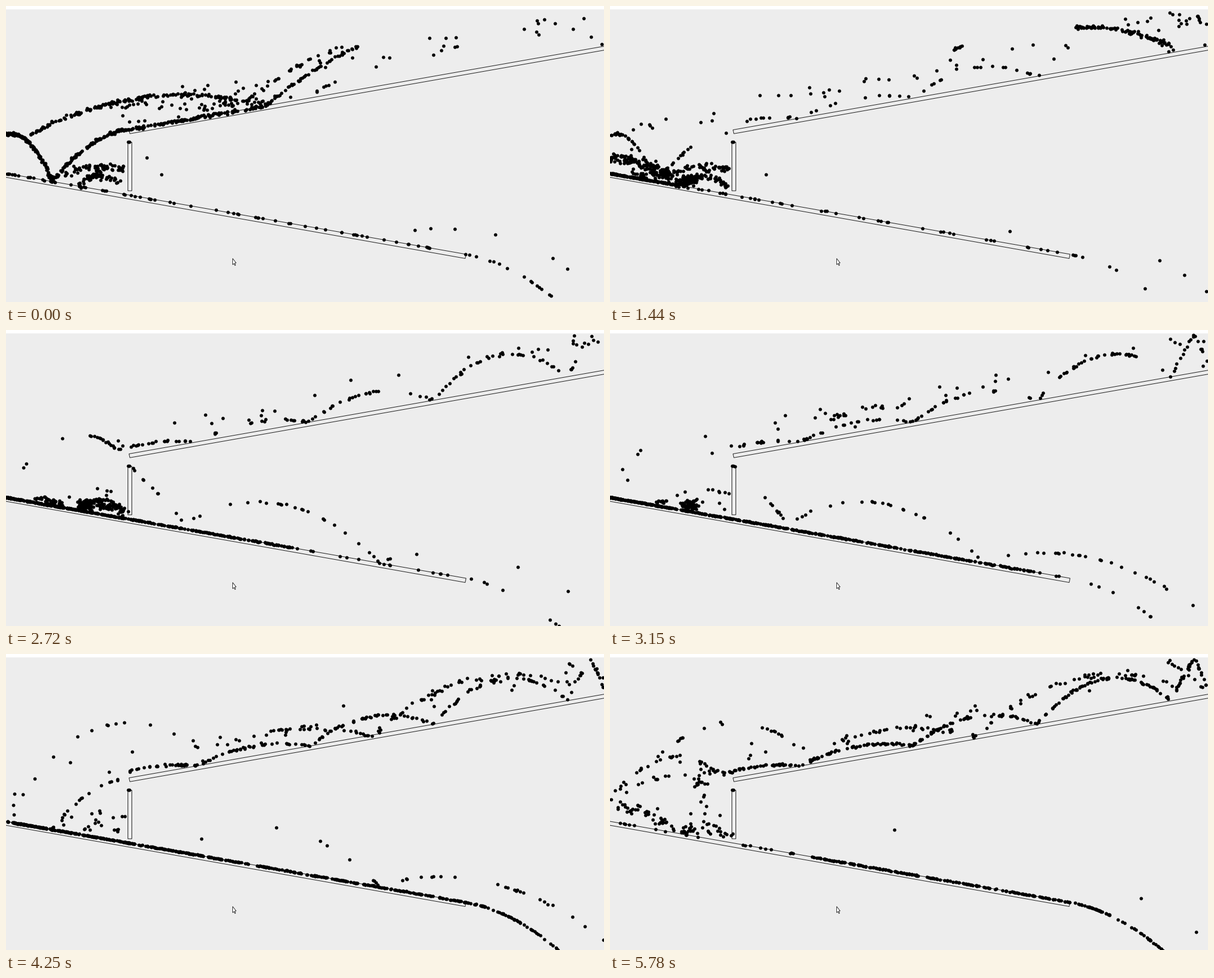
A matplotlib script for the animation above (5.88 s loop, 1062 by 527 pixels).

```python
import numpy as np
import matplotlib.pyplot as plt
from matplotlib.animation import FuncAnimation
from matplotlib.patches import Polygon, Rectangle

W, H, DPI = 1062, 527, 128
FRAMES, STEP = 56, 105
LOOP = FRAMES * STEP / 1000
GRAVITY = 2000  # px / s^2
SLOPE = np.tan(np.radians(10))
BG, PT = "#ededed", 72 / DPI

rng = np.random.default_rng(11)
streams = []


def floor(x):
    return 298 + SLOPE * x


def roof(x):
    return 220.5 - SLOPE * (x - 218)


def hops(points, rises, v=600):
    """Motion along parabolas joining the points; v limits the speed."""
    pts, rises = np.array(points, float), np.array(rises, float)
    d = np.diff(pts, axis=0)
    spans = np.maximum(np.sqrt(8 * rises / GRAVITY), np.hypot(*d.T) / v)
    ends = np.cumsum(spans)

    def move(age):
        age = age[(age >= 0) & (age < ends[-1])]
        k = np.searchsorted(ends, age, side="right")
        p = 1 - (ends[k] - age) / spans[k]
        pos = pts[k] + d[k] * p[:, None]
        pos[:, 1] -= 4 * rises[k] * p * (1 - p)
        return pos

    move.life = ends[-1]
    return move


def slide(age):
    """Steady acceleration down the ramp, then free fall past its end."""
    age = age[(age >= 0) & (age < slide.life)]
    x = 60 * age + 85 * age**2
    return np.column_stack([x, floor(x) + 0.0021 * np.maximum(x - 817, 0) ** 2])


slide.life = 3.15


def stream(move, n, start, stop, power=1.0, jit=1.0):
    """Launch n balls between two times; power < 1 makes the flow swell."""
    launch = start + (stop - start) * rng.random(n) ** power
    streams.append((move, launch, rng.normal(0, jit, (n, 2))))


# Lower ramp: a trickle, then a dense sheet with a sharp tail
stream(slide, 95, -3.1, 0.5, jit=0.3)
stream(slide, 700, 0.5, 4.05, jit=0.3)
stream(slide, 20, 4.05, LOOP, jit=0.3)

# Over the wall and along the ramp in long hops
spill = hops([(222, 243), (316, 345), (662, 412), (1062, 510)], [3, 69, 54])
stream(spill, 25, -1.5, LOOP, jit=0.8)
stream(spill, 60, 1.7, 3.6, jit=0.8)

# Growing bounces up the upper bar
climb = hops([(213, 210), (338, 199), (538, 163), (758, 125),
              (997, 83), (1037, 9), (1062, 62)], [6, 17, 33, 60, 4, 3])
stream(climb, 600, -2.5, LOOP, power=0.35)
stream(hops([(990, 10), (1060, 70)], [2], v=300), 120, -1, LOOP, power=0.6, jit=2)
stream(hops([(390, 160), (650, 146), (728, 87), (1000, 55)], [21, 4, 34]),
       230, 2.9, LOOP, jit=2)
stream(hops([(180, 200), (450, 150), (760, 80), (1062, 30)], [15, 15, 15], v=450),
       110, -2, LOOP, jit=9)

# Opening surge: off the ramp, onto the bar and away
surge = hops([(0, 229), (82, 312), (220, 219), (460, 178), (625, 72)], [27, 20, 0, 8])
stream(surge, 450, -1.6, 0.05, power=0.6, jit=1.3)
stream(hops([(40, 230), (425, 170), (740, 53), (1000, 72)], [36, 34, 24]),
       200, -1, 0.02, power=0.6, jit=1.5)
stream(hops([(185, 178), (330, 183), (460, 172)], [6, 4]), 60, -0.6, 0.05, jit=4)
stream(hops([(0, 229), (82, 312), (220, 219)], [27, 20]), 70, 0.9, 1.5)

# Leaps from the left edge up to the bar
leap = hops([(0, 258), (205, 220)], [55])
stream(leap, 40, 1.6, 2.3)
stream(leap, 70, 4.6, LOOP, jit=1.5)
stream(hops([(60, 205), (345, 172)], [66]), 65, 3.6, LOOP, jit=1.5)
stream(hops([(0, 250), (125, 216), (213, 208)], [6, 3]), 120, 4.5, LOOP, jit=2)
stream(hops([(82, 310), (220, 219)], [20]), 35, 3.6, 4.5)
stream(hops([(150, 237), (162, 215), (172, 300)], [4, 0], v=250), 40, 5.2, 6, jit=4)
stream(hops([(0, 270), (90, 200), (200, 215)], [10, 20], v=300), 60, 0, LOOP, jit=12)

# Heap in front of the wall
heap = hops([(0, 270), (130, 317), (212, 326)], [9, 12], v=150)
stream(heap, 230, 0.3, 1.5, jit=5)
stream(heap, 75, 4.3, LOOP, jit=5)
bounce = hops([(82, 311), (210, 290), (130, 318), (212, 328)], [14, 12, 20])
stream(bounce, 550, -0.7, 2.2, jit=2.5)
stream(bounce, 90, 2.2, LOOP, jit=2.5)
stream(hops([(132, 311), (150, 316)], [3], v=20), 160, 0.7, 3.3, jit=4)
stream(hops([(40, 300), (100, 310)], [2], v=60), 60, 1, 2.4, jit=3)


fig = plt.figure(figsize=(W / DPI, H / DPI), dpi=DPI, facecolor="white")
ax = fig.add_axes([0, 0, 1, 1])
ax.set(xlim=(0, W), ylim=(H, 0))
ax.axis("off")
ax.add_patch(Rectangle((0, 6), W, H - 6, fc=BG, ec="none", zorder=0))


def outline(pts, fill, ink, z):
    ax.add_patch(Polygon(pts, fc=fill, ec=ink, lw=PT, zorder=z, snap=False))


for bar in (
    [(-40, floor(-40)), (817, 442), (815.5, 449.5), (-41, floor(-41) + 7)],
    [(218.5, 220.5), (1100, roof(1100)), (1101, roof(1101) + 7), (220, 227.3)],
    [(216.5, 242.5), (223.5, 242.5), (223.5, 329), (216.5, 329)],
):
    outline(bar, BG, "#1a1a1a", 1)

# Mouse pointer
outline([(402.5, 449.5), (402.5, 460.5), (404.8, 458.5), (406.4, 462),
         (407.8, 461.4), (406.2, 457.8), (408.8, 457.5)], "white", "#333333", 4)

resting = np.array([(216.5, 242.3), (218.5, 242.3)])
balls = ax.scatter([], [], s=(6 * PT) ** 2, c="black", linewidths=0, zorder=3)


def draw(i):
    t = i * STEP / 1000
    parts = [resting]
    for move, launch, off in streams:
        age = t - launch
        parts.append(move(age) + off[(age >= 0) & (age < move.life)])
    balls.set_offsets(np.vstack(parts))
    return (balls,)


anim = FuncAnimation(fig, draw, frames=FRAMES, interval=STEP,
                     init_func=lambda: draw(0), repeat=True, repeat_delay=0)
plt.show()
```
